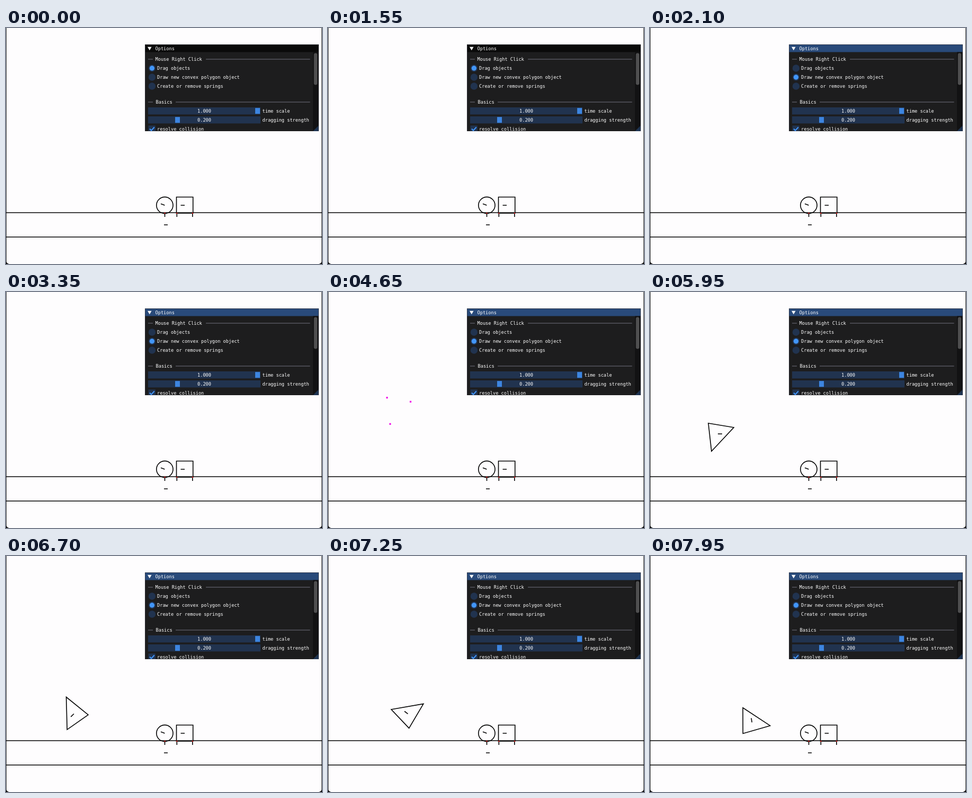
Write an HTML page that moves like this. It is 596 by 446 pixels and loops after 8000 ms.

```html
<!DOCTYPE html>
<html lang="en">
<head>
<meta charset="utf-8">
<title>Rigid body sandbox</title>
<style>
  html, body { margin: 0; width: 100%; height: 100%; overflow: hidden; background: #fefdfe; }
  svg { display: block; width: 100vw; height: 100vh; }
  text { font: 8.63px "DejaVu Sans Mono", monospace; fill: #fff; white-space: pre; }
  .ink { fill: none; stroke: #000; stroke-width: 1.6; }
  .frame { fill: #21334f; }
  .grab { fill: #3d85e0; }
  .rule { stroke: #48484f; stroke-width: 2; }
  .contact { fill: #e01818; }
  .dot { fill: #f012e8; }
</style>
</head>
<body>
<svg viewBox="0 0 596 446">
  <defs>
    <clipPath id="panelClip"><rect x="262" y="31" width="328" height="164"/></clipPath>
  </defs>

  <rect width="596" height="446" fill="#fefdfe"/>
  <path d="M.5 0V446M595.5 0V446" stroke="#333"/>
  <path d="M0 440Q1 445 6 446H0ZM596 440Q595 445 590 446H596Z"/>

  <g class="ink">
    <path d="M0 349H596M0 395H596M298 372H305"/>
    <circle cx="299.4" cy="335" r="15.6"/>
    <path d="M299.4 335L292 332.3M299.5 350V357"/>
    <path d="M321.5 319.5H352.7V350H321.5ZM337 335H329.5M322.3 350V357M351.8 350V357"/>
  </g>
  <g class="contact">
    <rect x="298.5" y="349" width="2" height="2"/>
    <rect x="321.3" y="349" width="2" height="2"/>
    <rect x="351" y="349" width="2" height="2"/>
  </g>

  <g id="dots"></g>
  <g id="body" class="ink">
    <path d="M-18-20.3L30-12.3L-12 32.7Z"/>
    <path d="M0 0H8"/>
  </g>
  <g id="touch">
    <path class="ink" d="M116 351V360"/>
    <rect class="contact" x="115" y="350" width="2" height="2"/>
  </g>

  <g clip-path="url(#panelClip)">
    <rect x="262" y="31" width="328" height="164" fill="#1d1d1e"/>
    <rect id="title" x="262" y="31" width="328" height="14.5"/>
    <path d="M267 35.8H274.6L270.8 42.2Z" fill="#fff"/>
    <rect x="579" y="45.5" width="10.5" height="150" fill="#121213"/>
    <rect x="580.7" y="47.5" width="6.4" height="60" rx="3.2" fill="#4f4f50"/>
    <path d="M590 184V195H579Z" fill="#1e3452"/>
    <path class="rule" d="M268 59H277M377 59H573.5M268 140H277M320 140H573.5"/>

    <g class="frame">
      <circle cx="275.4" cy="76" r="6.7"/>
      <circle cx="275.4" cy="93" r="6.7"/>
      <circle cx="275.4" cy="110" r="6.7"/>
      <rect x="268" y="150" width="212" height="13.4"/>
      <rect x="268" y="167" width="212" height="13.4"/>
      <rect x="268.5" y="184.3" width="13.4" height="13.4"/>
    </g>
    <circle id="radio" cx="275.4" r="4.7" fill="#4296fa"/>
    <rect class="grab" x="470" y="151.2" width="9" height="11"/>
    <rect class="grab" x="319" y="168.2" width="9" height="11"/>
    <path d="M271 190.5L274 193.7L279.8 187.5" fill="none" stroke="#4296fa" stroke-width="2"/>

    <text x="281.5" y="42">Options</text>
    <text x="281.5" y="62">Mouse Right Click</text>
    <text x="285" y="79">Drag objects</text>
    <text x="285" y="96">Draw new convex polygon object</text>
    <text x="285" y="113">Create or remove springs</text>
    <text x="282.5" y="143">Basics</text>
    <text x="361" y="160">1.000</text>
    <text x="361" y="177">0.200</text>
    <text x="483.5" y="160">time scale</text>
    <text x="483.5" y="177">dragging strength</text>
    <text x="285" y="194">resolve collision</text>
    <rect x="262.5" y="31.5" width="327" height="164" fill="none" stroke="#3a3a42" stroke-opacity=".7"/>
  </g>
</svg>

<script>
const LOOP = 8000, STEP = 50, GRAVITY = 300;
const FOCUS = 1750, SELECT = 1850, SPAWN = 5350;

// Corner clicks: time, x, y.
const clicks = [[3800, 111.3, 199.7], [4050, 155.7, 207.3], [4650, 117.2, 249.4]];

// Free flight between bounces; speeds are per second.
const flights = [
  { start: 5376, x: 128, y: 218.8, vx: 0, vy: 0, angle: 0, spin: 0 },
  { start: 6185, x: 128, y: 317, vx: 0, vy: -113.6, angle: 0, spin: 263 },
  { start: 6980, x: 128, y: 321.4, vx: 84, vy: -126, angle: 213, spin: 15 },
  { start: 7800, x: 194.7, y: 319, vx: -16, vy: -54, angle: 225, spin: 236 }
];

const byId = id => document.getElementById(id);
const show = (el, on) => el.setAttribute("visibility", on ? "visible" : "hidden");

const dots = clicks.map(([, x, y]) => {
  const dot = document.createElementNS("http://www.w3.org/2000/svg", "rect");
  const attrs = { x: x - 1.6, y: y - 1.6, width: 3.2, height: 3.2, class: "dot" };
  for (const key in attrs) dot.setAttribute(key, attrs[key]);
  byId("dots").append(dot);
  return dot;
});

function pose(time) {
  const flight = flights.findLast(f => f.start <= time) || flights[0];
  const s = Math.max(0, time - flight.start) / 1000;
  return {
    x: flight.x + flight.vx * s,
    y: flight.y + flight.vy * s + GRAVITY * s * s / 2,
    angle: flight.angle + flight.spin * s
  };
}

function draw(time) {
  byId("title").setAttribute("fill", time < FOCUS ? "#0a0a0a" : "#294a7a");
  byId("radio").setAttribute("cy", time < SELECT ? 76 : 93);
  dots.forEach((dot, i) => show(dot, time >= clicks[i][0] && time < SPAWN));

  const { x, y, angle } = pose(time);
  byId("body").setAttribute("transform", `translate(${x} ${y}) rotate(${angle})`);
  show(byId("body"), time >= SPAWN);
  show(byId("touch"), time >= 6200 && time < 6250);
}

const begin = performance.now();
function tick() {
  const time = (performance.now() - begin) % LOOP;
  draw(Math.floor(time / STEP) * STEP);
  requestAnimationFrame(tick);
}
tick();
</script>
</body>
</html>
```
